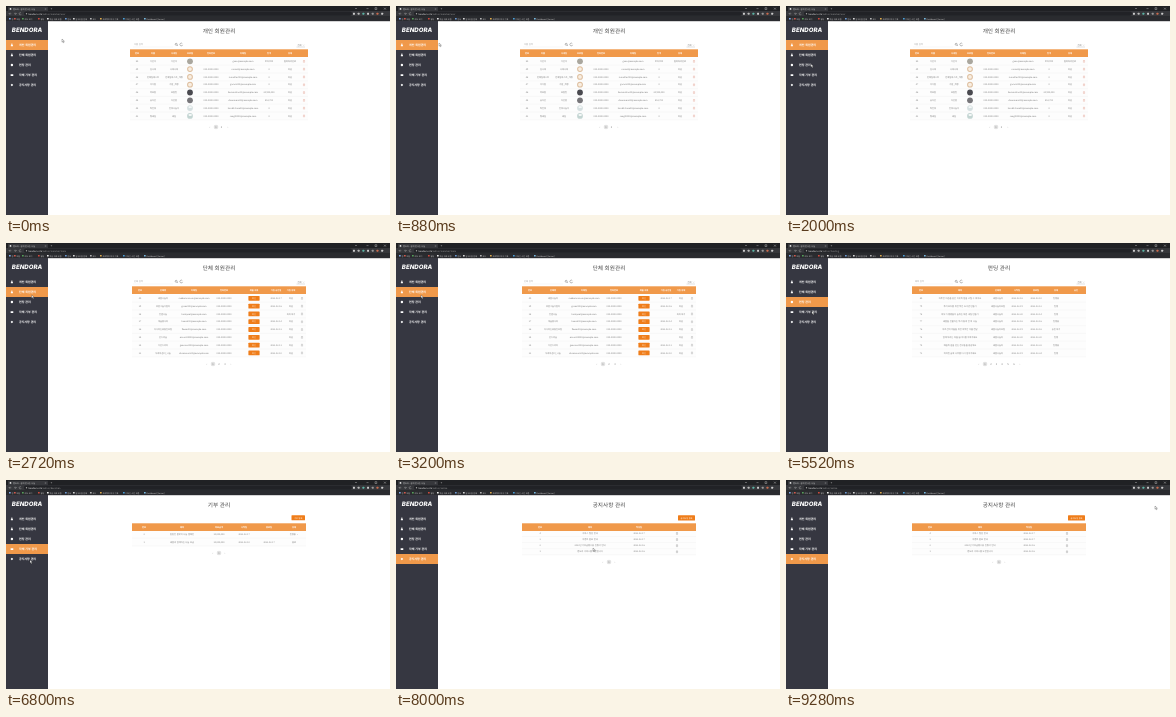
An HTML page that plays this animation: 384 px wide and 209 px high, repeating every 9360 ms.

```html
<!DOCTYPE html>
<html lang="ko">
<head>
<meta charset="utf-8">
<title>회원관리</title>
<style>
html, body { margin: 0; width: 100%; height: 100%; overflow: hidden; background: #fff; }
svg { display: block; width: 384px; height: 209px; }
text { font-family: "Noto Sans CJK KR", "Noto Sans CJK", "Noto Sans", sans-serif; text-rendering: geometricPrecision; }
</style>
</head>
<body>
<svg id="stage" viewBox="0 0 384 209"></svg>
<script>
const NS = 'http://www.w3.org/2000/svg';
const LOOP = 9360, STEP = 80;
const ORANGE = '#f0994a', DEEP = '#ef7d1a', GREY = '#777', SIDE = '#363741';
const stage = document.getElementById('stage');

function add(parent, tag, attrs, content) {
  const el = document.createElementNS(NS, tag);
  for (const k in attrs) el.setAttribute(k, attrs[k]);
  if (content !== undefined) el.textContent = content;
  parent.appendChild(el);
  return el;
}
const box = (p, x, y, width, height, fill, rx = 0) => add(p, 'rect', { x, y, width, height, fill, rx });
const dot = (p, cx, cy, r, fill) => add(p, 'circle', { cx, cy, r, fill });
const line = (p, d, stroke, w = 0.4) => add(p, 'path', { d, stroke, 'stroke-width': w, fill: 'none' });
// y is the vertical middle of the line of text
const label = (p, x, y, str, size, fill = GREY, anchor = 'middle', weight = 400) =>
  add(p, 'text', { x, y: y + size * 0.36, 'font-size': size, fill, 'text-anchor': anchor, 'font-weight': weight }, str);

// Browser window
function drawBrowser() {
  box(stage, 0, 0, 384, 15, '#202124');
  box(stage, 2, 0.8, 40, 5, '#36373b', 1);
  box(stage, 0, 5, 384, 5.4, '#36373b');
  box(stage, 18, 5.6, 328, 4.1, '#212226', 2);
  box(stage, 0, 10.4, 384, 4.8, '#2a2b2f');
  dot(stage, 4.5, 2.9, 0.9, '#e8e8e8');
  label(stage, 7, 2.9, '벤도라 - 쉽게 만나는 나눔', 2.1, '#ddd', 'start');
  label(stage, 39.5, 2.8, '×', 2.6, '#ccc');
  label(stage, 45.5, 2.8, '+', 3.2, '#ccc');
  line(stage, 'M349 2l1 1l1-1M360.5 2.6h2M369 1.7h1.8v1.8h-1.8zM378 1.7l1.9 1.9m0-1.9l-1.9 1.9', '#ccc');
  line(stage, 'M5.3 7.7H3m1-1l-1 1l1 1M8 7.7h2.3m-1-1l1 1l-1 1M15 7a1.1 1.1 0 1 0 .2 1.2', '#bbb');
  dot(stage, 20.5, 7.7, 0.7, '#aaa');
  label(stage, 22.5, 7.7, 'bendora.site', 2.3, '#eee', 'start');
  ['#ddd', '#bbb', '#5bb3a4', '#ddd', '#999', '#c96a4c', '#ccc']
    .forEach((c, i) => box(stage, 347 + i * 4.7, 6.8, 1.9, 1.9, c, 0.4));
  const marks = [[3, '앱', '#8ab4f8'], [8, '메일', '#d95c50'], [16, '지도 보기', '#58a65c'], [32, '영상', '#d94a3d'],
    [41, '학습 자료 모음', '#eee'], [59, '문서', '#6fa0dc'], [67, '알고리즘 문제', '#ddd'], [84, '코드', '#bbb'],
    [94, '프로젝트 회의 기록', '#e5b04f'], [117, '디자인 시안 모음', '#4aa3df'], [138, 'Dashboard [Server]', '#7cc0e8']];
  for (const [x, s, c] of marks) {
    box(stage, x, 11.9, 1.7, 1.7, c, 0.4);
    label(stage, x + 2.4, 12.8, s, 2, '#ccc', 'start');
  }
}

// Side menu
const menu = ['개인 회원관리', '단체 회원관리', '펀딩 관리', '자체 기부 관리', '공지사항 관리'];
let active;
function drawSide() {
  box(stage, 0, 15, 42, 194, SIDE);
  add(stage, 'text', { x: 21, y: 26.3, 'font-size': 6.1, fill: '#fff', 'text-anchor': 'middle',
    'font-weight': 800, 'font-style': 'italic', style: 'font-family:Inter,sans-serif' }, 'BENDORA');
  active = box(stage, 0, 0, 42, 10, ORANGE);
  menu.forEach((s, i) => {
    const y = 39 + i * 10;
    if (i < 2) {
      dot(stage, 5.9, y - 0.8, 0.75, '#fff');
      box(stage, 4.8, y, 2.2, 1.2, '#fff', 0.5);
    } else if (i === 2) {
      dot(stage, 5.9, y, 1.2, '#fff');
    } else if (i === 3) {
      box(stage, 4.6, y - 0.8, 2.7, 1.7, '#fff', 0.3);
    } else {
      add(stage, 'path', { d: `M4.6 ${y}l1.3-1.3l1.3 1.3l-1.3 1.3z`, fill: '#fff' });
    }
    label(stage, 13, y, s, 2.95, '#fff', 'start', 700);
  });
}

// Content pages
function search(g, hint, left) {
  label(g, left, 38.6, hint, 2.2, '#999', 'start');
  line(g, `M${left - 1} 41H167`, '#ddd', 0.25);
  line(g, 'M171 39l.9.9M171.2 38.3a1 1 0 1 0-2 0a1 1 0 1 0 2 0', '#555');
  line(g, 'M176.3 37.6a1.4 1.4 0 1 0 .3 1.3', '#555');
  label(g, 291.5, 39, '전체', 2.2, GREY, 'start');
  line(g, 'M297 38.7l.7.7l.7-.7M290.5 41h8.5', '#999', 0.3);
}

function pager(g, y, xs, current) {
  dot(g, xs[current], y, 2.3, '#e2e2e2');
  xs.forEach((x, i) => label(g, x, y, i === 0 ? '‹' : i === xs.length - 1 ? '›' : i, 2.5, '#777'));
}

function table(g, left, right, cols, heads, rows, first, gap) {
  box(g, left, first - gap * 0.5, right - left, rows.length * gap, '#fdfdfd');
  box(g, left, 43.3, right - left, 7.7, ORANGE);
  heads.forEach((s, i) => label(g, cols[i], 47.1, s, 2.2, '#fff', 'middle', 700));
  rows.forEach((row, r) => {
    const y = first + r * gap;
    line(g, `M${left} ${y + gap / 2}H${right}`, '#e9e9e9', 0.3);
    row.forEach((s, i) => s && label(g, cols[i], y, s, 2.2));
  });
}

function trash(g, x, y, color) {
  line(g, `M${x - 0.9} ${y - 0.8}h1.8M${x - 0.6} ${y - 0.7}v1.7h1.2v-1.7`, color, 0.35);
}

function button(g, x, y, w, h, s) {
  box(g, x, y, w, h, DEEP, 0.6);
  label(g, x + w / 2, y + h / 2, s, 2.1, '#fff');
}

const pages = menu.map((s, i) => {
  const g = add(stage, 'g', {});
  label(g, 213, 25.4, i === 3 ? '기부 관리' : s, 5.65, '#444');
  label(g, 36, 7.7, '/admin/' + ['member/user', 'member/team', 'funding', 'donation', 'notice'][i], 2.3, '#999', 'start');
  return g;
});
const rowY = i => 55.3 + i * 7.8;

function drawUsers(g) {
  search(g, '이름 검색', 128);
  const names = ['가온이', '김나래', '인메일테스트', '이가람', '박보람', '송다온', '최한빛', '정새길'];
  const nicks = ['가온이', '나래나래', '인메일테스트_계정', '가람_계정', '보람찬', '다온맘', '한빛나눔이', '새길'];
  const mails = ['gaon', 'narae0', 'inmailtest00', 'garam000', 'boramchan00', 'daonmom00', 'hanbitshare00', 'saegil0000'];
  const points = ['999,999', '0', '0', '0', '20,900,000', '551,700', '0', '0'];
  table(g, 124, 302, [131, 147, 168, 184, 205, 237, 263, 284],
    ['번호', '이름', '닉네임', '프로필', '전화번호', '이메일', '잔액', '상태'],
    names.map((n, i) => [50 - i, n, nicks[i], '', i ? '010-0000-0000' : '',
      mails[i] + '@example.com', points[i], i ? '회원' : '탈퇴처리완료']), 55.3, 7.8);
  ['#aaa79e', '#ddbd9c', '#ddbd9c', '#ddbd9c', '#4a4a50', '#77767a', '#d5dfe0', '#c3d5d2'].forEach((c, i) => {
    const y = rowY(i);
    dot(g, 184, y, 2.9, c);
    if (i > 0 && i < 4) dot(g, 184, y, 1.9, '#f8eee2');
    if (i > 5) box(g, 182.5, y - 1.8, 3.4, 1.8, '#f4f7f7', 0.8);
    trash(g, 298, y, '#df9180');
  });
  pager(g, 121, [204, 210, 215.5, 222], 1);
}

function drawTeams(g) {
  search(g, '단체 검색', 128);
  const teams = ['새봄나눔터', '푸른그늘가람터', '한결나눔', '해솔봉사회', '다시피는꽃동산모임', '온누리숲', '가온누리터', '두레마음터_나눔'];
  const mails = ['saebomnanum', 'green000', 'hankyeol', 'haesol00', 'flower00', 'onnuri00000', 'gaonnuri000', 'duremaum00'];
  table(g, 126, 300, [134, 157, 188, 218, 248, 270, 285],
    ['번호', '단체명', '이메일', '전화번호', '제출 서류', '가입 승인일', '가입 상태'],
    teams.map((n, i) => [40 - i, n, mails[i] + '@example.com', '010-0000-0000', '',
      i % 3 === 2 ? '' : '2023-02-' + (17 - i), i === 2 ? '처리 대기' : '회원']), 55.3, 7.8);
  teams.forEach((n, i) => {
    button(g, 242.4, rowY(i) - 2.4, 11.2, 4.8, '확인');
    trash(g, 296, rowY(i), '#999');
  });
  pager(g, 121, [201, 207, 213, 219, 225], 1);
}

function drawFunding(g) {
  search(g, '제목 검색', 129);
  const titles = ['따뜻한 마음을 담은 이웃의 집을 고칠 수 있어요', '우리 모두를 위한 작은 도서관 만들기', '바닷가 생명들이 숨쉬는 푸른 내일 만들기',
    '새봄을 선물하는 우리 동네 한 끼 나눔', '어르신의 겨울을 위한 따뜻한 이불 전달', '함께 자라는 마을 놀이터를 꾸며주세요',
    '배움의 길을 걷는 친구들을 응원해요', '버려진 숲에 나무를 다시 심어주세요'];
  table(g, 126, 300, [135, 174, 212, 231, 250, 270, 290],
    ['번호', '제목', '단체명', '시작일', '종료일', '상태', '승인'],
    titles.map((s, i) => [80 - i, s, i === 1 || i === 4 ? '새봄나눔터모임' : '새봄나눔터', '2023-02-' + (18 + i % 3),
      '2023-03-' + (10 + i * 2), i === 4 ? '승인 대기' : i % 3 ? '진행' : '진행중', '']), 55.3, 7.8);
  pager(g, 121, [193, 199, 205, 210.5, 216, 222, 228, 234], 1);
}

function drawDonation(g) {
  button(g, 285.5, 35.2, 13.5, 5.1, '기부 등록');
  table(g, 126, 300, [138, 176, 213, 238, 263, 288],
    ['번호', '제목', '목표금액', '시작일', '종료일', '상태'],
    [[2, '튼튼한 봄맞이 나눔 캠페인', '10,000,000', '2023-02-17', '', '진행중  ⌄'],
     [1, '새봄과 함께하는 나눔 모금', '10,000,000', '2023-02-10', '2023-02-17', '종료']], 54.3, 7.7);
  pager(g, 73, [207, 213, 219], 1);
}

function drawNotice(g) {
  button(g, 282, 35.2, 17, 5.3, '공지사항 등록');
  table(g, 126, 300, [144, 194, 243], ['번호', '제목', '작성일'],
    ['서비스 점검 안내', '이벤트 발표 안내', '2023년 기부금영수증 신청서 안내', '벤도라 서비스를 오픈합니다']
      .map((s, i) => [4 - i, s, '2023-02-' + (17 - (i >> 1))]), 53.4, 6.1);
  for (let i = 0; i < 4; i++) trash(g, 281, 53.4 + i * 6.1, '#888');
  pager(g, 82, [207, 213, 219], 1);
}

drawBrowser();
drawSide();
// Pages were created first, so lift them above the window
pages.forEach(g => stage.appendChild(g));
[drawUsers, drawTeams, drawFunding, drawDonation, drawNotice].forEach((draw, i) => draw(pages[i]));
const cursor = add(stage, 'path', { d: 'M0 0v3.2l.8-.7l.6 1.2l.6-.3l-.6-1.2h1z', fill: '#fff', stroke: '#222', 'stroke-width': 0.3 });

// Timeline: page switches and pointer stops [ms, x, y]
const clicks = [0, 2480, 3920, 5680, 6960];
const stops = [[0, 56, 33], [720, 56, 33], [1040, 30, 41], [1200, 28, 43], [1920, 25, 58], [2160, 25, 58],
  [2240, 26, 62], [2400, 26, 52], [3280, 25, 52], [3680, 26, 59], [4640, 26, 59], [5440, 26, 66],
  [5520, 26, 68], [6160, 26, 68], [6640, 26, 73], [6800, 24, 80], [7520, 25, 79], [7600, 40, 79],
  [8000, 197, 68], [8480, 336, 40], [8800, 369, 26], [LOOP, 369, 26]];
const ease = u => u * u * (3 - 2 * u);

function render(now) {
  const t = Math.floor((now % LOOP) / STEP) * STEP;
  const page = clicks.filter(c => c <= t).length - 1;
  pages.forEach((g, i) => g.setAttribute('visibility', i === page ? 'visible' : 'hidden'));
  active.setAttribute('y', 34 + page * 10);
  const k = stops.findIndex(s => s[0] > t);
  const [t0, x0, y0] = stops[k - 1], [t1, x1, y1] = stops[k];
  const u = ease((t - t0) / (t1 - t0));
  cursor.setAttribute('transform', `translate(${x0 + (x1 - x0) * u} ${y0 + (y1 - y0) * u})`);
}

const start = performance.now();
function tick() {
  render(performance.now() - start);
  requestAnimationFrame(tick);
}
tick();
</script>
</body>
</html>
```
